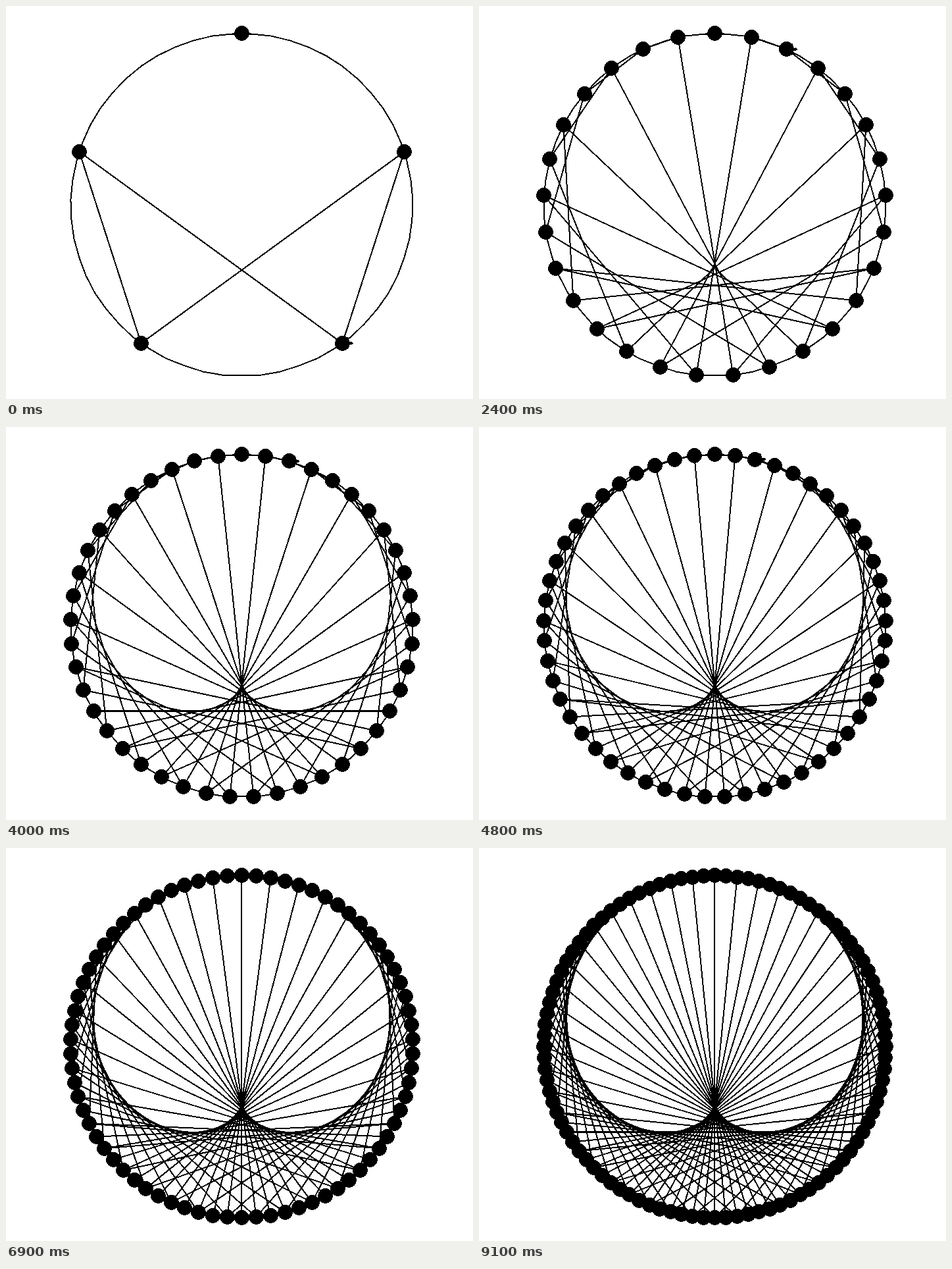
Recreate the animation shown at these times as an HTML page with a canvas. Size 710 by 597 pixels, loop 9.2 s.

```html
<!DOCTYPE html>
<html lang="en">
<head>
<meta charset="utf-8">
<title>Times-two circle</title>
<style>
  html, body { margin: 0; width: 100%; height: 100%; overflow: hidden; background: #fff; }
  canvas { display: block; width: 710px; height: 597px; }
</style>
</head>
<body>
<canvas id="stage" width="710" height="597"></canvas>
<script>
const W = 710, H = 597;
const CX = 358, CY = 301.33, R = 260;
const STEP = 100, STEPS = 92, FIRST = 5;
const DOT = 11.4, SIDES = 55;
const ctx = document.getElementById('stage').getContext('2d', { willReadFrequently: true });

// Left half of the turtle cursor as [side, forward]; mirrored for the other half
const HALF = [[0, 16], [2, 14], [1, 10], [4, 7], [7, 9], [9, 8], [6, 5], [7, 1],
              [5, -3], [8, -6], [6, -8], [4, -5], [0, -7]];
const TURTLE = HALF.concat(HALF.slice(1, -1).reverse().map(([s, f]) => [-s, f]));

// Counter-clockwise from the top
function pointAt(i, n) {
  const a = 2 * Math.PI * i / n;
  return [CX - R * Math.sin(a), CY - R * Math.cos(a)];
}

const snap = p => p.map(Math.round);

function polygon(points) {
  points.forEach(([x, y], i) => i ? ctx.lineTo(x, y) : ctx.moveTo(x, y));
  ctx.closePath();
}

function drawLines(points) {
  const n = points.length;
  ctx.save();
  ctx.translate(0.4, 0.4);
  ctx.lineWidth = 2;
  ctx.lineCap = ctx.lineJoin = 'round';

  const rim = [];
  for (let i = 0; i < SIDES; i++) rim.push(snap(pointAt(i + SIDES / 2, SIDES)));
  ctx.beginPath();
  polygon(rim);
  ctx.stroke();

  for (let i = 1; i < n; i++) {
    ctx.beginPath();
    ctx.moveTo(...points[i]);
    ctx.lineTo(...points[2 * i % n]);
    ctx.stroke();
  }
  ctx.restore();
}

function drawDots(points) {
  ctx.beginPath();
  for (const [x, y] of points) {
    ctx.moveTo(x + 0.5 + DOT, y + 0.5);
    ctx.arc(x + 0.5, y + 0.5, DOT, 0, 2 * Math.PI);
  }
  ctx.fill();
}

function drawTurtle([x, y]) {
  ctx.lineWidth = 1;
  ctx.lineJoin = 'round';
  ctx.beginPath();
  polygon(TURTLE.map(([side, ahead]) => [x + 0.5 + ahead, y + 0.5 + side]));
  ctx.fill();
  ctx.stroke();
}

// Hard pixel edges, black on white
function sharpen() {
  const image = ctx.getImageData(0, 0, W, H);
  const px = new Uint32Array(image.data.buffer);
  for (let i = 0; i < px.length; i++) {
    px[i] = (px[i] & 255) < 128 ? 0xff000000 : 0xffffffff;
  }
  ctx.putImageData(image, 0, 0);
}

function draw(n) {
  const points = Array.from({ length: n }, (_, i) => snap(pointAt(i, n)));
  ctx.fillStyle = '#fff';
  ctx.fillRect(0, 0, W, H);
  ctx.fillStyle = ctx.strokeStyle = '#000';
  drawLines(points);
  drawDots(points);
  drawTurtle(pointAt(n - 2, n));
  sharpen();
}

let shown = 0;
const start = performance.now();

function tick() {
  const step = Math.floor((performance.now() - start) / STEP) % STEPS;
  const n = FIRST + step;
  if (n !== shown) draw(shown = n);
  requestAnimationFrame(tick);
}
tick();
</script>
</body>
</html>
```
